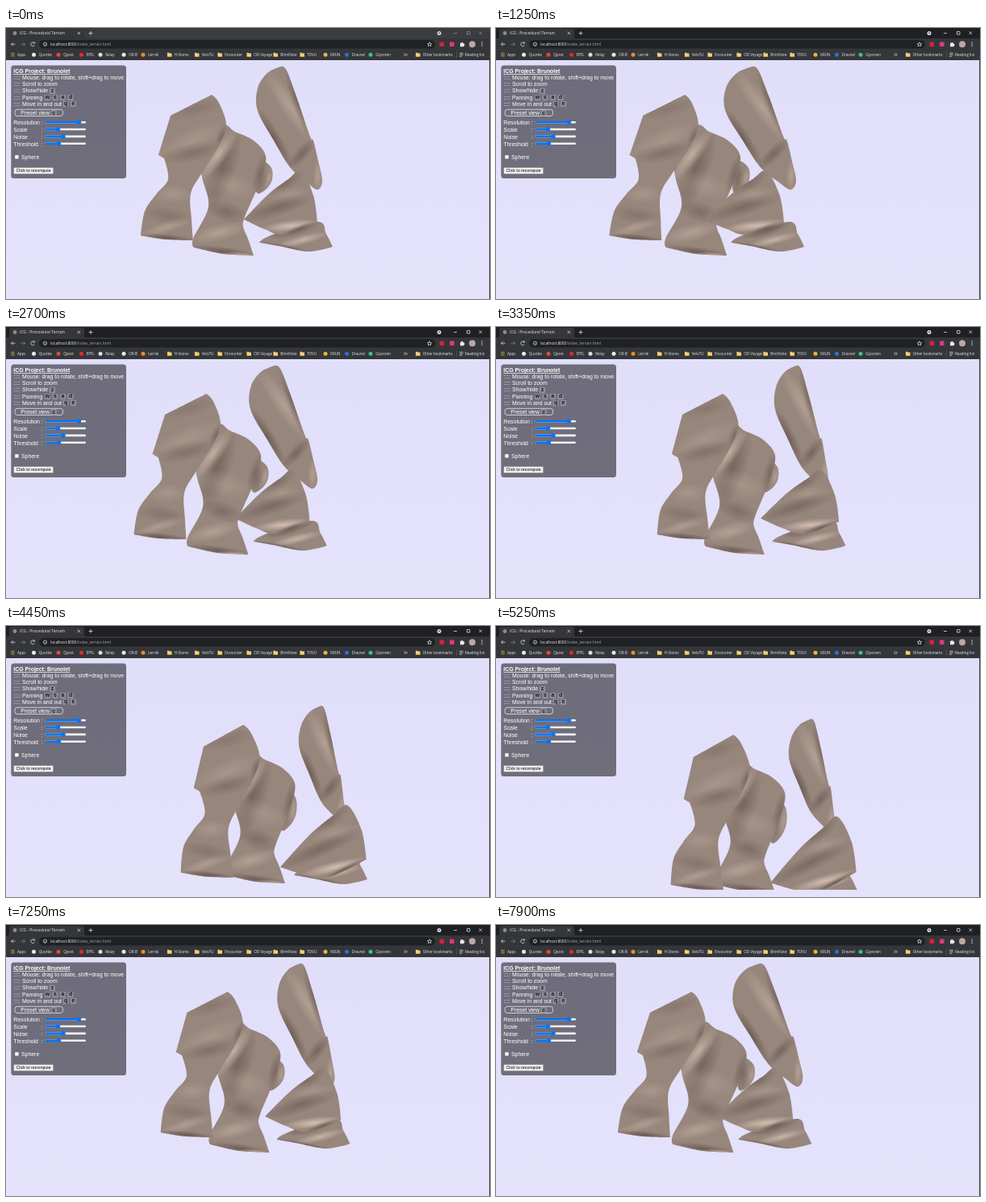
Write an HTML page with a canvas that moves like this. It is 600 by 337 pixels and loops after 8000 ms.

```html
<!DOCTYPE html>
<html lang="en">
<head>
<meta charset="utf-8">
<title>Procedural Terrain</title>
<style>
html, body { margin: 0; width: 100%; height: 100%; overflow: hidden; background: #e3e0fb; }
canvas, svg { position: absolute; left: 0; top: 0; width: 600px; height: 337px; display: block; }
.ui { font-family: "Open Sans", "Noto Sans", sans-serif; fill: #e8eaed; }
.page { font: 6.9px "Liberation Sans", Arial, sans-serif; fill: #fff; }
.line { fill: none; stroke: #dcdde0; stroke-width: .8; }
/* the window gains focus just after the start */
#strip { animation: focus 8s step-end infinite; }
#controls { animation: wake 8s step-end infinite; }
#cursor { animation: show 8s step-end infinite; }
@keyframes focus { 0% { fill: #3a3c40; } 1.25%, 100% { fill: #1f2023; } }
@keyframes wake { 0% { opacity: .5; } 1.25%, 100% { opacity: 1; } }
@keyframes show { 0% { opacity: 0; } 24% { opacity: 1; } 25.625%, 100% { opacity: 0; } }
</style>
</head>
<body>
<canvas id="stage"></canvas>
<svg viewBox="0 0 600 337">
  <g class="ui">
    <rect width="600" height="40" fill="#35363a"/>
    <rect id="strip" width="600" height="13"/>
    <path d="M2 13q2 0 2-2V3q0-2 2-2h89q2 0 2 2v8q0 2 2 2z" fill="#35363a"/>
    <circle cx="11" cy="6.5" r="2.4" fill="#8b8d91"/>
    <text x="17" y="8.4" font-size="5.1">ICG : Procedural Terrain</text>
    <path class="line" d="M88.7 4.7l3.4 3.4m0-3.4l-3.4 3.4M102.5 6.5h5m-2.5-2.5v5"/>
    <path id="controls" class="line" d="M555 6.5h4M571.5 4.5h3.5v3.5h-3.5zM586.5 4.5l3.5 3.5m0-3.5l-3.5 3.5"/>
    <circle cx="537" cy="6.5" r="2.5" fill="#dcdde0"/>
    <path d="M535.8 5.8h2.4l-1.2 1.6z" fill="#1f2023"/>
    <rect x="41" y="15" width="491" height="10.5" rx="5.2" fill="#202124"/>
    <path class="line" d="M11.5 20.2h-5m2.2-2.2l-2.2 2.2l2.2 2.2M35 18.6a2.4 2.4 0 1 0 .3 2.7M35.3 17.3v1.8h-1.8"/>
    <path class="line" stroke-opacity=".45" d="M18.5 20.2h5m-2.2-2.2l2.2 2.2l-2.2 2.2"/>
    <circle class="line" cx="48.5" cy="20.2" r="2.1"/>
    <path class="line" d="M48.5 20v1.2M525 17.7l.8 1.7 1.8.2-1.3 1.2.4 1.8-1.7-.9-1.7.9.4-1.8-1.3-1.2 1.8-.2z"/>
    <text x="55" y="22.1" font-size="4.8">localhost:8000<tspan fill="#a4a7ac">/index_terrain.html</tspan></text>
    <rect x="537.5" y="17.5" width="5.6" height="5.6" rx="1" fill="#d5213d"/>
    <rect x="550" y="17.5" width="5.6" height="5.6" rx="1" fill="#e3387f"/>
    <path d="M563 18.7h1.3a1 1 0 0 1 2 0h1.3v1.3a1 1 0 0 1 0 2v1.2h-4.6z"/>
    <circle cx="578" cy="20.2" r="4" fill="#b9a9a2"/>
    <circle cx="590" cy="18" r=".7"/><circle cx="590" cy="20.2" r=".7"/><circle cx="590" cy="22.4" r=".7"/>
    <g id="marks" font-size="4.5"></g>
    <path class="line" d="M493.5 31.5l1.5 1.7-1.5 1.7m2.3-3.4l1.5 1.7-1.5 1.7M562.2 31.3h4.500m-4.500 2h4.500m-4.500 2h3"/>
    <path d="M558.5 29v8" stroke="#5d5f63" stroke-width=".6"/>
  </g>
  <rect x="599" y="40" width="1" height="297" fill="#44434c"/>

  <rect x="6.3" y="46.5" width="142.7" height="140.5" rx="3.5" fill-opacity=".51"/>
  <g class="page" id="panel">
    <text x="9.3" y="56.3" font-weight="bold" text-decoration="underline">ICG Project: Brunolet</text>
    <rect x="11" y="101.3" width="59.5" height="8.2" rx="3" fill="none" stroke="#e6e5ea" stroke-width=".8"/>
    <text x="18.3" y="107.8">Preset view</text>
    <rect x="11" y="158" width="4.8" height="4.8" rx=".8" stroke="#767676" stroke-width=".5"/>
    <text x="19" y="162.8">Sphere</text>
    <rect x="9.5" y="173.4" width="49.2" height="8.2" rx="1" fill="#efefef" stroke="#777" stroke-width=".5"/>
    <text x="12.6" y="179.4" font-size="5.2" fill="#000">Click to recompute</text>
  </g>
  <path id="cursor" d="M481.3 240v6l1.4-1.2 1 2.2 1-.5-1-2.1h1.8z" fill="#fff" stroke="#55535e" stroke-width=".5"/>
</svg>
<script>
// ---------- static interface ----------
const add = (id, s) => document.getElementById(id).insertAdjacentHTML('beforeend', s);
const label = (x, y, s) => `<text x="${x}" y="${y}">${s}</text>`;
const dot = (x, c) => `<circle cx="${x}" cy="33.2" r="2.5" fill="${c}"/>`;
const folder = x => `<path d="M${x - 2.6} 30.8h2.2l.7.8h2.7v4.2h-5.6z" fill="#f4d06f"/>`;
const key = (x, y, s) => `<rect x="${x - 3.7}" y="${y - 5.6}" width="7.4" height="7.3" rx="1.2" fill="#8f8d96"/>
  <text x="${x}" y="${y - .3}" text-anchor="middle" font-weight="bold" fill="#1c1b20">${s}</text>`;

for (let i = 0; i < 9; i++)
  add('marks', `<rect x="${6 + i % 3 * 1.8}" y="${30.7 + (i / 3 | 0) * 1.8}" width="1.2" height="1.2"
    fill="${['#e25b4a', '#f0b73b', '#4aa564'][i % 3]}"/>`);
add('marks', label(14, 34.9, 'Apps') + label(569, 34.9, 'Reading list'));
Object.entries({
  Quorbe: [34.5, '#e9e9ee'], Qpost: [65, '#dd4b3e'], EPFL: [93.5, '#e02b2b'], Relay: [117, '#d9dadd'],
  'OR-B': [146, '#e8e8ea'], Lernik: [170, '#f08a24'], 'H-Stores': [202.5], VeloTU: [236.5], Encounter: [265],
  'OD Voyage': [301], BrimNote: [334], TOVU: [367], KRUN: [396, '#e8b53a'], Dravnel: [422.5, '#2f6fd0'],
  Glyvoren: [452, '#35c487'], 'Other bookmarks': [510.5]
}).forEach(([name, [x, color]]) =>
  add('marks', (color ? dot(x, color) : folder(x)) + label(x + 6.2, 34.9, name)));

const help = ['Mouse: drag to rotate, shift+drag to move', 'Scroll to zoom', 'Show/hide', 'Panning', 'Move in and out'];
const row = i => 64.3 + i * 8.07;
help.forEach((s, i) => add('panel', label(9.8, row(i), '::::') + label(20, row(i), s)));
[...'wsad'].forEach((c, i) => add('panel', key(51.5 + i * 9.5, row(3), c)));
[...'qe'].forEach((c, i) => add('panel', key(74 + i * 9.5, row(4), c)));
add('panel', key(57.5, row(2), 'z') + key(59.2, 107.8, 'c'));
Object.entries({ Resolution: 90.5, Scale: 64.5, Noise: 71, Threshold: 65.5 }).forEach(([s, x], i) => {
  const y = 117.2 + i * 8.85;
  const bar = (end, c) => `<rect x="48.5" y="${y - 1.3}" width="${end - 48.5}" height="2.6" rx="1.3" fill="${c}"/>`;
  add('panel', label(9.3, y + 2.8, s) + label(43.7, y + 2.8, ':') + bar(99, '#efefef') + bar(x, '#0075ff') +
    `<circle cx="${x}" cy="${y}" r="2.7" fill="#0075ff"/>`);
});

// ---------- surface pieces ----------
// outline: key points of the middle pose, * marks a corner.
// drift, bow, lift: planes [base, per 100 px x, per 100 px y] around (300, 170) that move each point
// with the turn, the square of the turn, and the tilt.
// streaks: [from, to, half width, light (+) or dark (-)].
const pieces = [
  { outline: '*341,48 324,56 312,75 312,103 332,140 352,173 372,191 386,201 392,190 387,165 381,140 377,135 361,88 348,53',
    drift: [54.5, -22, 0], bow: [5, 0, 7], lift: [44, 0, -6],
    streaks: [[3, 5, 8, -.5], [1, 10, 10, .35], [13, 11, 6, -.4], [5, 10, 7, -.4], [7, 9, 5, .35]] },
  { outline: '318,166 329,174 330,188 324,199 313,206 309,198 314,182',
    drift: [30, 0, 0], bow: [0, 0, 0], lift: [38, 0, 30],
    streaks: [[0, 4, 6, -.35], [1, 3, 4, .3]] },
  { outline: '268,121 284,129 307,140 322,159 317,185 309,205 296,235 294,247 300,262 *307,283 270,281 *233,273 232,262 251,222 243,185 240,150',
    drift: [37, -3, 2], bow: [0, 0, 0], lift: [37, 0, 0],
    streaks: [[1, 13, 15, -.4], [1, 14, 9, .6], [3, 5, 7, -.35], [14, 5, 14, .2], [13, 6, 11, -.3],
      [12, 7, 9, .35], [11, 9, 5, -.5], [10, 9, 3, .5]] },
  { outline: '*204,109 *255,83 264,93 273,121 263,148 243,180 229,206 230,238 *232,264 198,263 *167,258 172,228 186,207 201,188 *196,162 *189,158',
    drift: [44.5, 0, 6], bow: [0, 0, 0], lift: [44, 0, 5],
    streaks: [[0, 2, 9, -.18], [15, 3, 13, .2], [14, 4, 10, -.28], [12, 6, 10, .22], [11, 7, 9, -.22],
      [10, 7, 6, .3], [10, 8, 4, -.55], [3, 4, 6, -.35]] },
  { outline: '*314,267 328,258 386,241 397,256 *405,272 375,278 338,271',
    drift: [43, 0, 0], bow: [0, 0, 0], lift: [43, 0, 0],
    streaks: [[1, 2, 8, -.6], [6, 3, 5, .6], [0, 5, 3, -.5]] },
  { outline: '366,178 350,188 325,207 *295,238 320,250 345,257 *386,242 381,208',
    drift: [60, -4, 0], bow: [14, -21, 0], lift: [54, -15, 10],
    streaks: [[0, 2, 9, -.3], [2, 7, 9, .2], [3, 7, 9, -.35], [4, 6, 6, .75], [5, 6, 4, -.6]] }
];
for (const p of pieces)
  p.points = p.outline.split(' ').map(s => {
    const [x, y] = s.replace('*', '').split(',').map(Number);
    const plane = ([base, px, py]) => base + px * (x - 300) / 100 + py * (y - 170) / 100;
    return { x, y, corner: s[0] === '*', drift: plane(p.drift), bow: plane(p.bow), lift: plane(p.lift) };
  });

// turn: -1 left, 0 middle pose, 1 right; tilt: 0 level
const LOOP = 8000;
const turnKeys = [[0, 0], [1050, -.5], [1200, -.5], [2000, -1], [2050, -1], [3350, .66], [3650, 1], [6930, 1],
  [7750, -.28], [7900, -.32], [LOOP, -.32]];
const tiltKeys = [[0, 0], [3800, 0], [4450, 1], [4700, 1.32], [5250, 1.32], [6000, 1.08], [6150, 1.08],
  [6600, .68], [6980, 0], [LOOP, 0]];
function at(keys, t) {
  const i = Math.max(1, keys.findIndex(k => k[0] >= t));
  const [t0, v0] = keys[i - 1], [t1, v1] = keys[i];
  return v0 + (v1 - v0) * (t - t0) / (t1 - t0);
}

const pose = (p, turn, tilt) => p.points.map(q => ({
  x: q.x + q.drift * turn - q.bow * turn * turn,
  y: q.y + q.lift * tilt,
  corner: q.corner
}));

function smooth(pts) {
  const n = pts.length, path = new Path2D();
  const tangent = i => {
    if (pts[i].corner) return [0, 0];
    const u = pts[(i + n - 1) % n], v = pts[(i + 1) % n];
    return [(v.x - u.x) / 6, (v.y - u.y) / 6];
  };
  path.moveTo(pts[0].x, pts[0].y);
  for (let i = 0; i < n; i++) {
    const j = (i + 1) % n, p = pts[i], q = pts[j], s = tangent(i), e = tangent(j);
    path.bezierCurveTo(p.x + s[0], p.y + s[1], q.x - e[0], q.y - e[1], q.x, q.y);
  }
  path.closePath();
  return path;
}

const canvas = document.getElementById('stage'), ctx = canvas.getContext('2d');
const dpr = window.devicePixelRatio || 1;
canvas.width = 600 * dpr;
canvas.height = 337 * dpr;
ctx.scale(dpr, dpr);

function streak(a, b, width, power) {
  const rgb = power > 0 ? '232,208,192' : '68,54,48', alpha = Math.abs(power);
  const g = ctx.createRadialGradient(0, 0, 0, 0, 0, 1);
  g.addColorStop(0, `rgba(${rgb},${alpha})`);
  g.addColorStop(.5, `rgba(${rgb},${alpha * .5})`);
  g.addColorStop(1, `rgba(${rgb},0)`);
  ctx.save();
  ctx.translate((a.x + b.x) / 2, (a.y + b.y) / 2);
  ctx.rotate(Math.atan2(b.y - a.y, b.x - a.x));
  ctx.scale(Math.hypot(b.x - a.x, b.y - a.y) * .58, width * 1.2);
  ctx.fillStyle = g;
  ctx.fillRect(-1, -1, 2, 2);
  ctx.restore();
}

function drawPiece(p, turn, tilt) {
  const pts = pose(p, turn, tilt), path = smooth(pts);
  ctx.fillStyle = '#97867c';
  ctx.fill(path);
  ctx.save();
  ctx.clip(path);
  for (const [i, j, width, power] of p.streaks) streak(pts[i], pts[j], width, power);
  ctx.restore();
}

const sky = ctx.createLinearGradient(0, 40, 0, 337);
sky.addColorStop(0, '#e1defa');
sky.addColorStop(1, '#e5e2fc');

function frame(now) {
  const t = now % LOOP, turn = at(turnKeys, t), tilt = at(tiltKeys, t);
  ctx.fillStyle = sky;
  ctx.fillRect(0, 0, 600, 337);
  ctx.save();
  ctx.beginPath();
  ctx.rect(0, 40, 600, 288);
  ctx.clip();
  pieces.forEach(p => drawPiece(p, turn, tilt));
  ctx.restore();
  requestAnimationFrame(frame);
}
requestAnimationFrame(frame);
</script>
</body>
</html>
```
